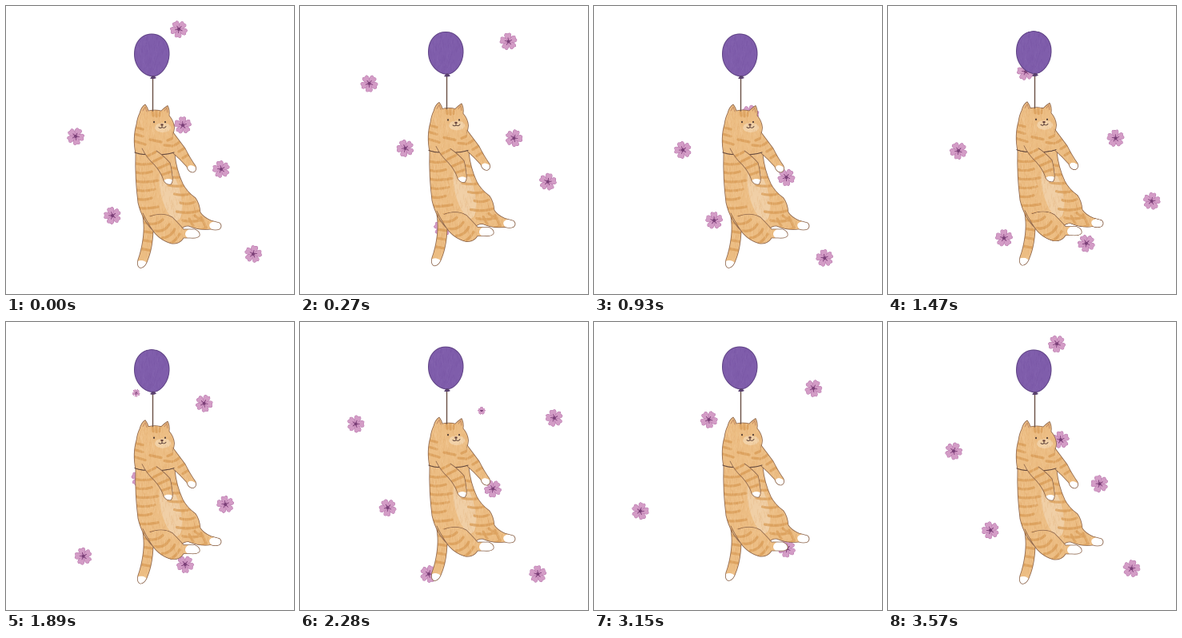
Write an HTML page with a canvas that moves like this. It is 360x360 px and loops after 3600 ms.

```html
<!DOCTYPE html>
<html lang="en">
<head>
<meta charset="utf-8">
<title>Cat on a balloon</title>
<style>
html, body { margin: 0; width: 100%; height: 100%; overflow: hidden; background: #fff; }
canvas { display: block; width: 360px; height: 360px; }
</style>
</head>
<body>
<canvas id="stage" width="360" height="360"></canvas>
<script>
const LOOP = 3600, STEP = 30, BOB = 900, FADE = 90, SCALE = 2;
const ctx = document.getElementById('stage').getContext('2d');

let seed = 7;
const random = () => (seed = seed * 16807 % 2147483647) / 2147483647;

function makeLayer(size, draw) {
  const layer = document.createElement('canvas');
  layer.width = layer.height = size * SCALE;
  const c = layer.getContext('2d');
  c.scale(SCALE, SCALE);
  c.lineCap = c.lineJoin = 'round';
  draw(c);
  return layer;
}

function line(c, d, color, width) {
  c.strokeStyle = color;
  c.lineWidth = width;
  c.stroke(new Path2D(d));
}

function oval(c, x, y, rx, ry, color, angle = 0) {
  c.fillStyle = color;
  c.beginPath();
  c.ellipse(x, y, rx, ry, angle, 0, 7);
  c.fill();
}

// Short pencil strokes inside the current clip
function hatch(c, x, y, w, h, colors) {
  for (let i = 0; i < w * h / 9; i++) {
    const px = x + random() * w, py = y + random() * h;
    c.globalAlpha = 0.2;
    line(c, `M${px} ${py}l${random() * 3 - 1.5} ${3 + random() * 4}`, colors[i % colors.length], 0.7);
  }
  c.globalAlpha = 1;
}

const FUR = '#ecbd83', STRIPE = '#d99b55', INK = '#8b6349';

// One furry part: fill, stripes, white paw, pencil texture, outline
function fur(c, d, box, stripes, paw, extra) {
  const path = new Path2D(d);
  c.save();
  c.clip(path);
  c.fillStyle = FUR;
  c.fill(path);
  if (extra) extra();
  c.globalAlpha = 0.75;
  line(c, stripes, STRIPE, 3.2);
  c.globalAlpha = 1;
  hatch(c, ...box, ['#f8dcb4', '#d0914f', '#f2cc9a']);
  if (paw) oval(c, ...paw);
  c.restore();
  line(c, d, INK, 0.8);
}

function bodyStripes() {
  let d = '';
  for (let y = 196; y < 275; y += 11) {
    const shift = Math.max(0, y - 215) * 0.4;
    d += `M160 ${y}q10 4 ${22 + y % 3 * 4} 0`;
    d += `M${226 + shift} ${y + 5}q-10 4 ${-18 - y % 4 * 3} 1`;
  }
  return d;
}

const cat = makeLayer(360, c => {
  fur(c, 'M169 255Q174 272 171 292Q169 306 165 317Q163 326 168 327.500Q174 327 177 318Q183 304 184 282',
    [162, 255, 24, 74], 'M168 270l18 3M168 281l18 3M167 292l18 3M166 303l18 3', [169, 325, 8, 7, '#fff']);

  fur(c, 'M167 134Q169 126 174 123Q177 127 178 131Q186 129 194 131Q198 127 202 124.500Q205 130 204 137' +
    'Q210 144 210.500 152Q210 157 209 160L211 185Q213 205 221 222Q226 232 237 240Q242 247 243 258' +
    'Q247 264 256 268L267 271Q271 275 267 279Q262 281 256 279Q242 281 228 275Q222 275 219 279L215 285' +
    'Q200 292 185 282Q170 268 165 246Q161 215 162 185Q158 165 163 148Q164 140 167 134Z',
    [158, 122, 114, 170],
    bodyStripes() + 'M183 131l1 6M188 131l0 7M193 132l-1 5M162 152l9 2M161 160l10 3M161 169l13 4' +
    'M180 167l14 3M211 164l-9 4M198 174l10 1M236 262l8 6M244 264l6 13M229 266l5 9',
    [264, 276, 10, 6, '#fff', 0.3],
    () => {
      oval(c, 206, 235, 12, 34, '#f0cfa6', -0.25);
      oval(c, 196, 152, 10, 6, '#f2d2a8');
    });

  fur(c, 'M209 158Q215 166 224 178Q230 190 237 200Q239 206 234 208Q228 208 226 201Q218 192 209 184',
    [207, 158, 32, 50], 'M211 174l9-6M216 182l10-6M221 190l10-6', [233, 205, 7, 5, '#fff', 0.7]);

  fur(c, 'M180 263Q196 257 208 264Q216 272 222 279L236 279Q243 282 242 287Q240 291 230 290L222 290' +
    'Q217 298 207 297Q192 293 183 280Q177 271 171 259',
    [172, 257, 70, 42], 'M178 272q10 2 18-5M186 281q12 2 18-8M195 290q11-1 16-11M206 296q7-3 11-11',
    [235, 285, 11, 7, '#fff']);

  line(c, 'M161 183Q168 186 178 185.500Q198 187 210 183', '#64483c', 1.1);

  fur(c, 'M170 178Q176 190 185 198Q194 208 197 218Q200 224 206 223Q209 220 208 213Q207 203 205 196Q197 187 188 181',
    [170, 176, 40, 48], 'M176 188l12-6M183 195l14-7M190 203l14-6M195 211l12-4', [203, 221, 7, 5, '#fff']);

  // Face and ears
  oval(c, 185, 145, 1, 1.3, '#4c3a34');
  oval(c, 199, 145, 1, 1.3, '#4c3a34');
  oval(c, 195, 148.5, 1.7, 1.2, '#6b443c');
  line(c, 'M195 149v2.500M191 151.500q2 2 4 0q3 2 5-1', '#5b4038', 0.9);
  line(c, 'M171 131l3-5 2 6M198 131l3-4 1 6', '#c48a62', 1);

  // Balloon
  line(c, 'M183.500 90V131', '#6a5045', 1.4);
  const balloon = new Path2D('M182 35C195 35 204.500 46 204 61C203.500 75 194 87 184 88C171 87 160.500 75 160.500 60C160.500 45 170 35 182 35Z');
  c.save();
  c.clip(balloon);
  c.fillStyle = '#7f5dab';
  c.fill(balloon);
  hatch(c, 160, 33, 45, 56, ['#9273ba', '#6e4c9b']);
  c.restore();
  c.strokeStyle = '#604486';
  c.lineWidth = 1;
  c.stroke(balloon);
  c.fillStyle = '#59406e';
  c.fill(new Path2D('M183 87L180 90.500Q184 92 188 90L185 87Z'));
});

const flower = makeLayer(28, c => {
  c.translate(14, 14);
  for (let i = 0; i < 5; i++) {
    c.fillStyle = '#d39cc6';
    const petal = new Path2D('M0 -1C-4 -4 -5.500 -9 -2.500 -10.500L0 -9.800L2.500 -10.500C5.500 -9 4 -4 0 -1Z');
    c.fill(petal);
    c.strokeStyle = '#bd7fb2';
    c.lineWidth = 0.6;
    c.stroke(petal);
    line(c, 'M0 0V-4.500', '#85457f', 1);
    c.rotate(Math.PI * 2 / 5);
  }
  oval(c, 0, 0, 1.9, 1.9, '#7b4078');
});

// Drifting flowers: time, x and y at that time, birth, death, speed in px per ms
const flowers = [
  [0, 87, 163, -310, 1640, 0.165, 0.055],
  [0, 133, 262, -610, 1080, 0.167],
  [0, 221, 149, -750, 660, 0.172, 0.06],
  [0, 269, 204, -1440, 560, 0.151, 0.058],
  [0, 309, 310, -1700, 250, 0.151, 0.059],
  [0, 216, 29, -350, 420],
  [570, 164, 5, 510, 800],
  [570, 136, 114, 40, 1800],
  [570, 85, 249, 340, 1800, 0.181, 0.053],
  [570, 138, 337, 540, 750],
  [930, 111, 180, 600, 2170, 0.17, 0.05],
  [1470, 88, 181, 1290, 2820, 0.189, 0.034],
  [1470, 145, 290, 1000, 2460, 0.188, 0.031],
  [1470, 172, 82, 1130, 2420, 0.18, 0.047],
  [2280, 227, 111, 1850, 2320],
  [2280, 161, 315, 1650, 2480],
  [2730, 205, 59, 2440, 3270]
];

function drawFlower([t0, x, y, birth, death, vx = 0.165, vy = 0.057], index, time) {
  const age = (time - birth + LOOP) % LOOP;
  const left = death - birth - age;
  if (left <= 0) return;
  const dt = birth + age - t0;
  const size = Math.min(1, age / FADE, left / FADE);
  ctx.save();
  ctx.translate(x + vx * dt, y + vy * dt);
  ctx.rotate(index * 1.3 + age * 0.0015);
  ctx.scale(size, size);
  ctx.drawImage(flower, -14, -14, 28, 28);
  ctx.restore();
}

function frame(now) {
  const time = Math.floor(now % LOOP / STEP) * STEP;
  ctx.fillStyle = '#fff';
  ctx.fillRect(0, 0, 360, 360);
  flowers.forEach((f, i) => drawFlower(f, i, time));
  const lift = 2 * (1 - Math.cos(time / BOB * Math.PI * 2));
  ctx.drawImage(cat, 0, -lift, 360, 360);
  requestAnimationFrame(frame);
}

const start = performance.now();
requestAnimationFrame(() => frame(0));
const tick = frame;
frame = () => tick(performance.now() - start);
</script>
</body>
</html>
```
